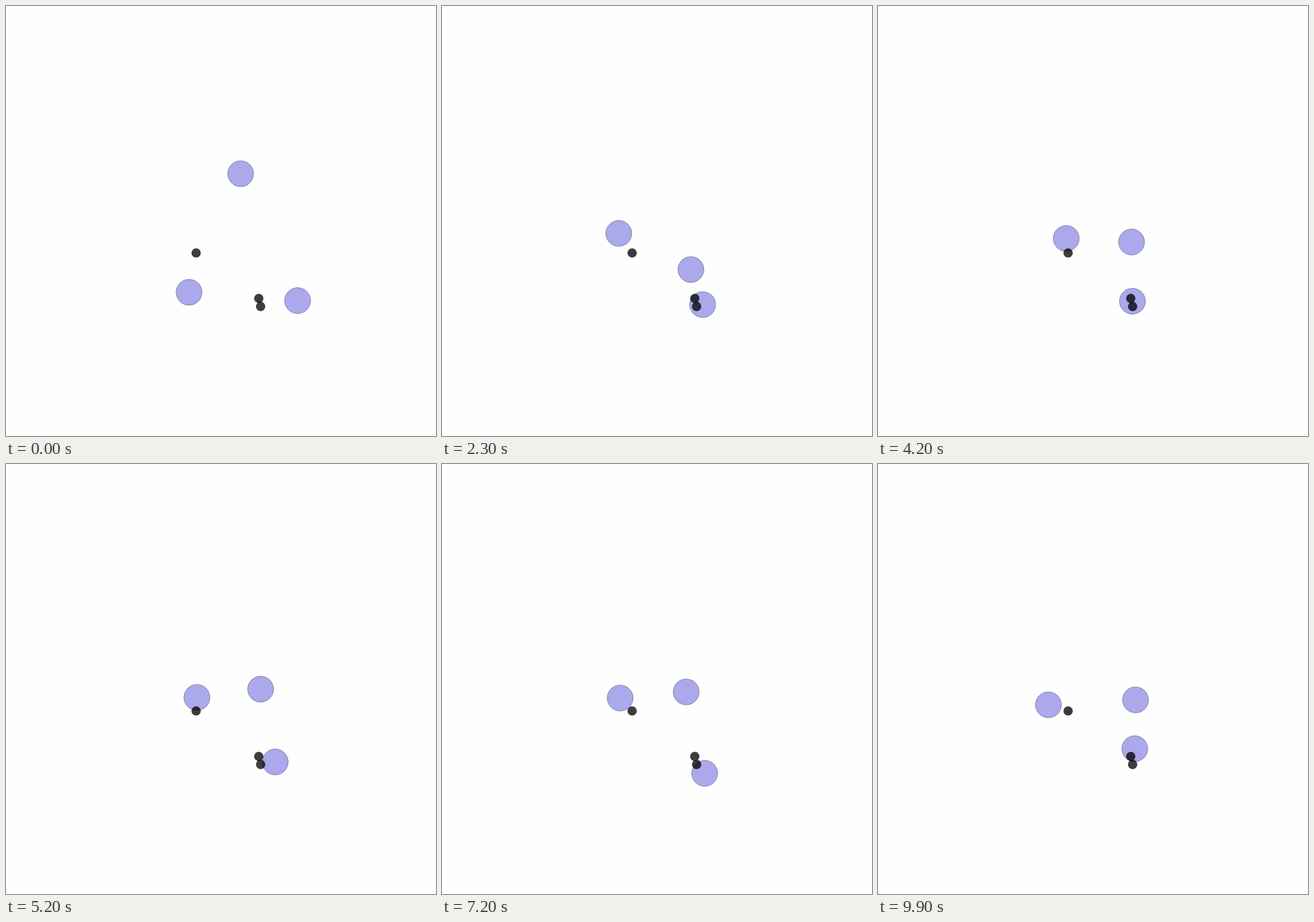
Recreate the animation shown at these times as an HTML page with a canvas. Size 700 px wide and 700 px high, loop 10 s.

```html
<!DOCTYPE html>
<html>
<head>
<meta charset="utf-8">
<style>
html, body { margin: 0; width: 100%; height: 100%; overflow: hidden; background: #fefefe; }
canvas { display: block; }
</style>
</head>
<body>
<canvas id="stage" width="700" height="700"></canvas>
<script>
const ctx = document.getElementById('stage').getContext('2d');
const LOOP = 10000, STEP = 100;

const anchors = [[309.5, 402], [411.5, 476], [414.5, 489.2]];

// Waypoints of each drifting disc: [seconds, x, y]
const paths = [
  [[0, 382, 273], [1.3, 288.3, 355], [1.7, 279, 366], [3.3, 302.5, 377], [5.2, 310.8, 380],
   [6, 271, 380], [7.2, 290, 381], [8.5, 296.2, 378], [9.6, 271, 392], [9.9, 277.5, 392]],
  [[0, 298, 466], [1.3, 394.2, 446], [3.3, 416.2, 412], [4.4, 412, 378], [5.2, 414.5, 366.5],
   [6, 408, 353], [7.2, 397.5, 371], [8.5, 432, 385.3], [9.9, 419.2, 384]],
  [[0, 474.7, 479.6], [0.5, 462, 487], [1.3, 426.2, 464.5], [1.9, 428, 489], [3.3, 415.2, 478.5],
   [4.4, 414, 481], [5.2, 438.3, 485], [6, 451, 493], [6.9, 440, 510], [7.2, 427.6, 503.5],
   [7.7, 430, 488], [8.5, 419.6, 480.5], [9.9, 418, 463.5]]
];

function at(path, t) {
  let i = 1;
  while (i < path.length - 1 && path[i][0] < t) i++;
  const [ta, xa, ya] = path[i - 1], [tb, xb, yb] = path[i];
  const k = (t - ta) / (tb - ta);
  return [xa + (xb - xa) * k, ya + (yb - ya) * k];
}

function disc([x, y], r, fill, stroke) {
  ctx.beginPath();
  ctx.arc(x, y, r, 0, 2 * Math.PI);
  ctx.fillStyle = fill;
  ctx.fill();
  if (stroke) {
    ctx.strokeStyle = stroke;
    ctx.stroke();
  }
}

function draw(now) {
  const t = Math.floor(now % LOOP / STEP) * STEP / 1000;
  ctx.fillStyle = '#fefefe';
  ctx.fillRect(0, 0, 700, 700);
  for (const path of paths) disc(at(path, t), 21.1, 'rgba(91,87,217,0.5)', 'rgba(50,50,90,0.5)');
  for (const p of anchors) disc(p, 7.6, 'rgba(0,0,0,0.76)');
}

const start = performance.now();
function tick() {
  draw(performance.now() - start);
  requestAnimationFrame(tick);
}
tick();
</script>
</body>
</html>
```
